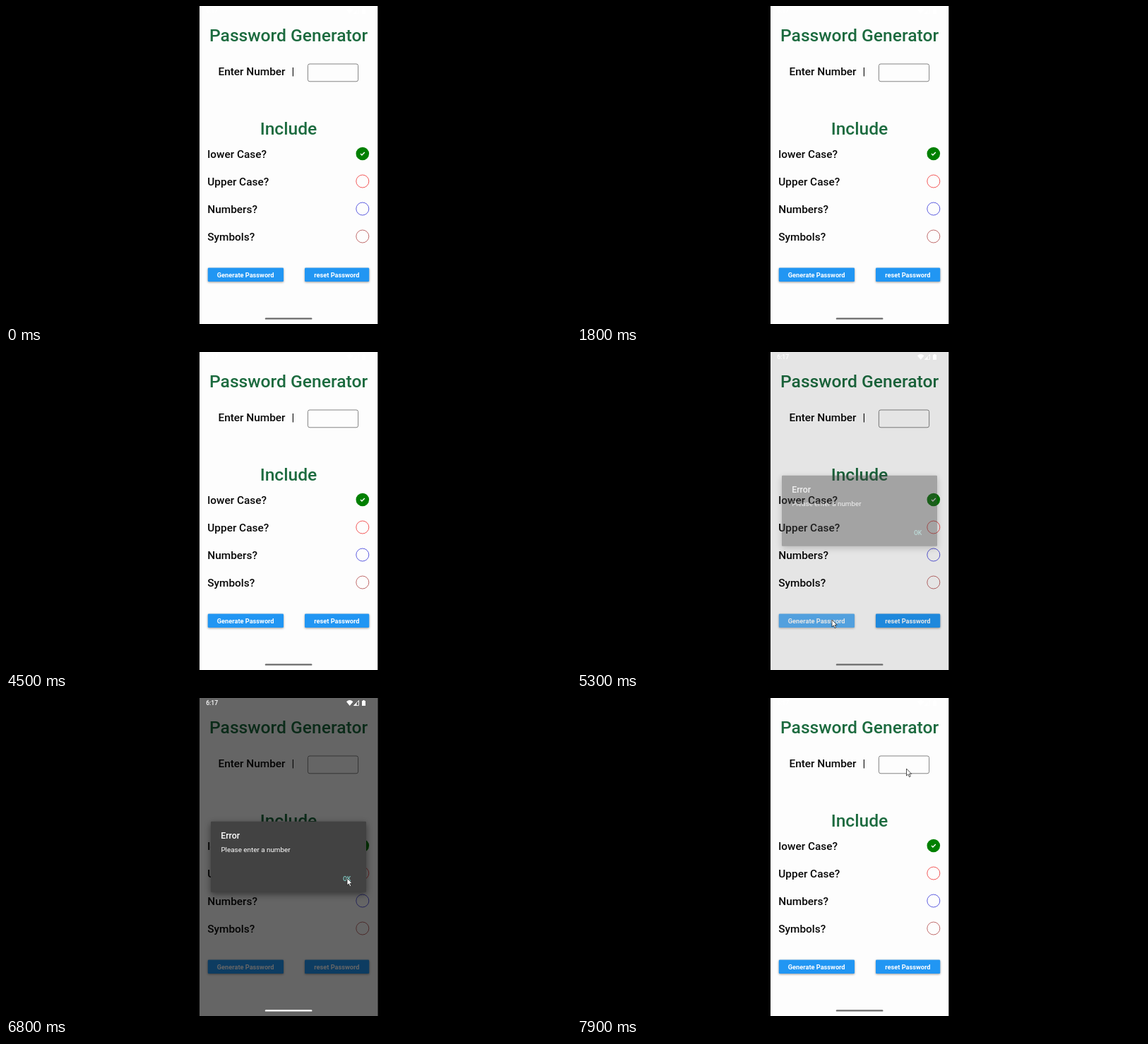
Animation of 800x450 px, one loop 8 s. Source, as an HTML page:

```html
<!DOCTYPE html>
<html lang="en">
<head>
<meta charset="utf-8">
<title>Password Generator</title>
<style>
  html, body { margin: 0; width: 100%; height: 100%; overflow: hidden; background: #000; }
  svg { display: block; width: 800px; height: 450px; }
  text { font-family: Roboto, sans-serif; font-weight: 500; white-space: pre; }
  .title { font-size: 24.62px; fill: #1c6b3f; text-anchor: middle; }
  .label { font-size: 15.39px; fill: #080808; }
  .button rect { fill: #2196f3; filter: drop-shadow(0 1.5px 1.5px #0006); }
  .button text { font-size: 9.23px; font-weight: 700; fill: #fff; text-anchor: middle; }
  .ring { fill: none; stroke-width: .8; }
  .body { font-size: 9.85px; font-weight: 400; fill: #fff; }
</style>
</head>
<body>
<svg viewBox="0 0 800 450">
  <clipPath id="screen"><rect x="274" width="252.5" height="450"/></clipPath>
  <g clip-path="url(#screen)">
    <rect x="274" width="252.5" height="450" fill="#fdfdfd"/>

    <text class="title" x="400" y="50.3">Password Generator</text>
    <text class="label" x="300.5" y="98.2">Enter Number</text>
    <text class="label" x="406.5" y="98.2" text-anchor="middle" style="font-weight:400">|</text>
    <rect x="427.4" y="82" width="71.2" height="24.8" rx="2.6" fill="none" stroke="#777" stroke-width=".9"/>

    <text class="title" x="400" y="182.3">Include</text>
    <text class="label" x="285.3" y="214.8">lower Case?</text>
    <text class="label" x="285.3" y="253.8">Upper Case?</text>
    <text class="label" x="285.3" y="292.8">Numbers?</text>
    <text class="label" x="285.3" y="331.8">Symbols?</text>
    <circle cx="504.8" cy="209" r="9.3" fill="#008000"/>
    <path d="M502 209l1.9 1.9 3.9-4" fill="none" stroke="#fff" stroke-width="1.4"/>
    <circle class="ring" cx="504.8" cy="248" r="9" stroke="#f03030"/>
    <circle class="ring" cx="504.8" cy="287" r="9" stroke="#3535d8"/>
    <circle class="ring" cx="504.8" cy="326" r="9" stroke="#b04848"/>

    <g class="button" id="generate">
      <rect x="285.8" y="370.5" width="107.2" height="19.6" rx="1.3"/>
      <text x="339.2" y="383.8">Generate Password</text>
    </g>
    <g class="button">
      <rect x="423" y="370.5" width="91.2" height="19.6" rx="1.3"/>
      <text x="468.4" y="383.8">reset Password</text>
    </g>

    <rect id="dim" x="274" width="252.5" height="450"/>

    <g fill="#fff">
      <text x="283.2" y="10.4" style="font-size:8.62px">6:17</text>
      <path d="M482 5.2Q486.7 1 491.4 5.2L486.7 11Z"/>
      <path d="M499.5 3.6V10.6H492.5Z" fill="none" stroke="#fff" stroke-width=".9"/>
      <path d="M492.2 11L496.5 6.7V11Z"/>
      <path d="M504 4h1.4v-1h2.2v1h1.4v7h-5z"/>
    </g>
    <rect id="handle" x="366.8" y="441.2" width="66.6" height="2.4" rx="1.2"/>

    <g id="dialog">
      <rect x="290" y="174.8" width="220" height="100" rx="1.2" fill="#424242"
        style="filter:drop-shadow(0 3px 5px #0007)"/>
      <text x="304.3" y="198.6" fill="#fff" style="font-size:12.31px">Error</text>
      <text class="body" x="304.4" y="217.6">Please enter a number</text>
      <text x="476.9" y="259.2" fill="#80cbc4" style="font-size:8.62px">OK</text>
    </g>

    <path id="cursor" d="M0 0V10L2.3 7.9 4 11.7 5.7 10.9 4 7.3H7.1Z"
      fill="#fff" stroke="#222" stroke-width=".8"/>
  </g>
</svg>
<script>
  const LOOP = 8000, STEP = 100;
  const [generate, dim, handle, dialog, cursor] =
    ['generate', 'dim', 'handle', 'dialog', 'cursor'].map(id => document.getElementById(id));

  // time, x, y of the pointer tip
  const path = [
    [4600, 420, 452], [5100, 361, 379], [5500, 361, 379], [6300, 483, 255],
    [7100, 483, 255], [7700, 466.5, 100], [8000, 466.5, 100]
  ];

  const ramp = (t, from, to) => Math.min(1, Math.max(0, (t - from) / (to - from)));
  const ease = p => p * p * (3 - 2 * p);

  function pointer(t) {
    const i = path.findIndex(key => key[0] > t);
    if (i < 1) return path[0].slice(1);
    const [t0, x0, y0] = path[i - 1], [t1, x1, y1] = path[i];
    const p = ease(ramp(t, t0, t1));
    return [x0 + (x1 - x0) * p, y0 + (y1 - y0) * p];
  }

  function draw(t) {
    const shown = ramp(t, 5240, 5390), hidden = ramp(t, 6890, 7060);
    dialog.setAttribute('opacity', shown * (1 - hidden));
    dim.setAttribute('opacity', .6 * shown ** 2 * (1 - hidden));
    handle.setAttribute('fill', t >= 5500 && t < 7000 ? '#fff' : '#6b6b6b');

    const press = ramp(t, 5050, 5200) - ramp(t, 5200, 5380);
    generate.setAttribute('opacity', 1 - .6 * press);

    const [x, y] = pointer(t);
    cursor.setAttribute('transform', `translate(${x} ${y})`);
    cursor.setAttribute('visibility', t > 4600 ? 'visible' : 'hidden');
  }

  const start = performance.now();
  function frame() {
    const t = (performance.now() - start) % LOOP;
    draw(Math.floor(t / STEP) * STEP);
    requestAnimationFrame(frame);
  }
  frame();
</script>
</body>
</html>
```
